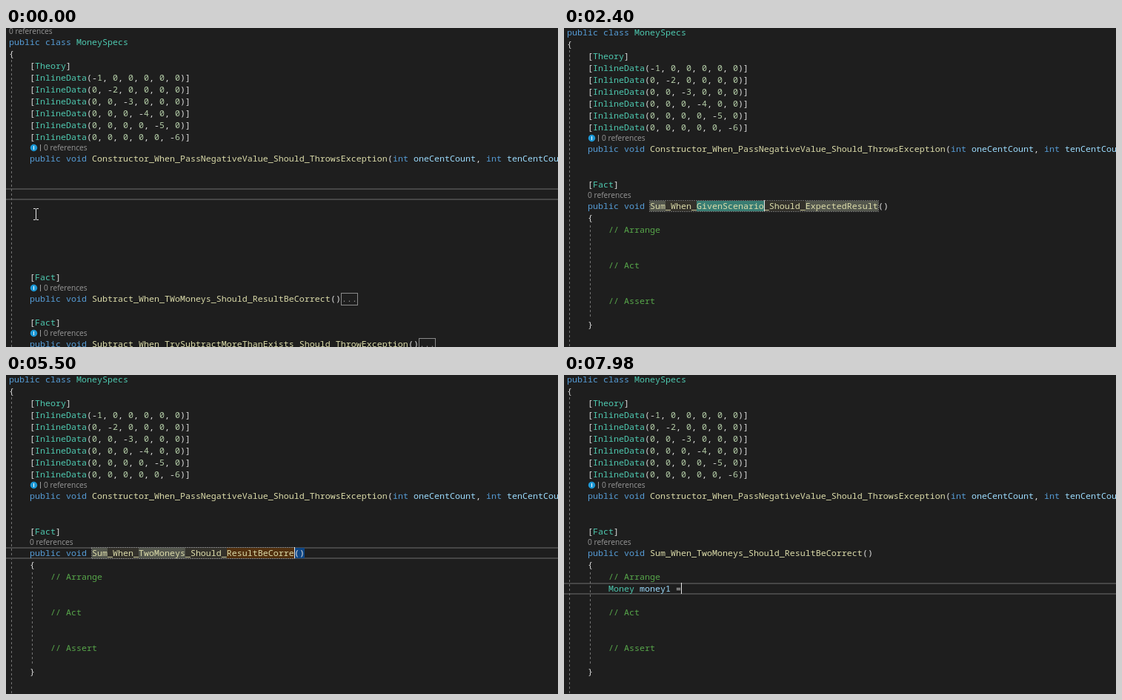
Write an HTML page with a canvas that moves like this. It is 745 px wide and 430 px high and loops after 8000 ms.

```html
<!DOCTYPE html>
<html lang="en">
<head>
<meta charset="utf-8">
<title>Code editor</title>
<style>
html, body { margin: 0; height: 100%; overflow: hidden; background: #1e1e1e; }
canvas { display: block; }
</style>
</head>
<body>
<canvas id="stage" width="745" height="430"></canvas>
<script>
const ctx = document.getElementById('stage').getContext('2d');
const LOOP = 8000, CHAR = 7, NAME_X = 116, NAME_ROW = 232;
const EXPAND = 1400, LENS = 1700;
const FONT = '11.667px "Noto Sans Mono", "DejaVu Sans Mono", monospace';
const LENS_FONT = '10.2px "Open Sans", "Noto Sans", sans-serif';
const TOKEN = /\/\/.*|\w+|[^\w\s]/g;

const COLORS = [
  [/^\/\//, '#57a64a'],
  [/^(public|class|void|int)$/, '#569cd6'],
  [/^(MoneySpecs|Theory|InlineData|Fact|Money)$/, '#4ec9b0'],
  [/^\d/, '#b5cea8'],
  [/_/, '#dcdcaa'],
  [/^(oneCentCount|tenCentCount|money1)$/, '#9cdcfe']
];

// Time of each key press, per word
const FIELDS = [
  { blank: 'MethodName', word: 'Sum', keys: [1900, 2220, 2300], from: 0 },
  { blank: 'GivenScenario', word: 'TwoMoneys', from: 2400,
    keys: [2720, 2800, 2880, 2960, 3040, 3120, 3200, 3280, 3440] },
  { blank: 'ExpectedResult', word: 'ResultBeCorrect', from: 3560,
    keys: [3880, 4160, 4380, 4520, 4580, 4620, 4780, 4880, 5000, 5140, 5240, 5400, 5500, 5720, 5780] }
];
const JOINS = ['_When_', '_Should_', ''];

function rect(x, y, w, h, color) {
  ctx.fillStyle = color;
  ctx.fillRect(x, y, w, h);
}

// Draws one line of code; y is the top of its 16 px row
function code(text, x, y) {
  ctx.font = FONT;
  for (const m of text.matchAll(TOKEN)) {
    const rule = COLORS.find(([re]) => re.test(m[0]));
    ctx.fillStyle = rule ? rule[1] : '#dcdcdc';
    ctx.fillText(m[0], x + m.index * CHAR, y + 12);
  }
}

function lens(x, base, icon) {
  if (icon) {
    ctx.fillStyle = '#1c97d4';
    ctx.beginPath();
    ctx.arc(x + 5.5, base - 3.5, 4.7, 0, 7);
    ctx.fill();
    rect(x + 5, base - 6, 1, 5, '#fff');
    rect(x + 14, base - 8, 1, 9, '#999');
    x += 19;
  }
  ctx.font = LENS_FONT;
  ctx.fillStyle = '#999';
  ctx.fillText('0 references', x, base);
}

function guide(x, from, to) {
  ctx.strokeStyle = '#747474';
  ctx.lineWidth = 1;
  ctx.setLineDash([3, 3]);
  ctx.beginPath();
  ctx.moveTo(x + .5, from);
  ctx.lineTo(x + .5, to);
  ctx.stroke();
  ctx.setLineDash([]);
}

function currentRow(y) {
  rect(0, y, 745, 2, '#464646');
  rect(0, y + 14, 745, 2, '#464646');
}

const caret = (x, y) => rect(x, y, 1, 15, '#e6e6e6');
const brace = (x, y) => rect(x, y + 1, CHAR, 14, '#0e4583');

function folded(text, y) {
  code(text, 32, y);
  const x = 32 + text.length * CHAR;
  ctx.strokeStyle = '#8a8a8a';
  ctx.lineWidth = 1;
  ctx.strokeRect(x + .5, y + .5, 22, 16);
  ctx.fillStyle = '#999';
  ctx.fillText('...', x + 1, y + 12);
}

function ibeam(x, y) {
  rect(x, y - 7, 1, 14, '#e8e8e8');
  for (const end of [-8, 7]) {
    rect(x - 3, y + end, 3, 1, '#e8e8e8');
    rect(x + 1, y + end, 3, 1, '#e8e8e8');
  }
}

function mouse(t) {
  if (t >= 800) return;
  const ease = (a, b) => {
    const p = Math.min(1, Math.max(0, (t - a) / (b - a)));
    return p * p * (3 - 2 * p);
  };
  const away = ease(300, 640);
  ibeam(Math.round(40 + 70 * away), Math.round(251 - 42 * ease(20, 240) + 159 * away));
}

function head(top) {
  guide(7, top + 32, 430);
  code('public class MoneySpecs', 4, top);
  code('{', 4, top + 16);
  code('[Theory]', 32, top + 32);
  for (let i = 0; i < 6; i++) {
    const args = Array.from({ length: 6 }, (_, k) => k === i ? -1 - i : 0);
    code(`[InlineData(${args.join(', ')})]`, 32, top + 48 + i * 16);
  }
  lens(4, top - 3);
  lens(32, top + 154, true);
  code('public void Constructor_When_PassNegativeValue_Should_ThrowsException(int oneCentCount, int tenCentCount,', 32, top + 157);
}

function before(t) {
  const row = t < 260 ? 216 : 200;
  currentRow(row);
  head(11);
  const typed = t >= 860;
  if (typed) code('x', 32, row);
  if (t >= 260) caret(typed ? 39 : 32, row);
  code('[Fact]', 32, 328);
  lens(32, 354, true);
  folded('public void Subtract_When_TWoMoneys_Should_ResultBeCorrect()', 357);
  code('[Fact]', 32, 389);
  lens(32, 415, true);
  folded('public void Subtract_When_TrySubtractMoreThanExists_Should_ThrowException()', 418);
  mouse(t);
}

function methodName(t) {
  const active = t < 2400 ? 0 : t < 3560 ? 1 : 2;
  const fresh = t < FIELDS[0].keys[0];
  const editing = t < 5940;
  let name = '', caretX = 0, selected = false;
  const boxes = FIELDS.map((f, i) => {
    const count = f.keys.filter(k => k <= t).length;
    const text = count ? f.word.slice(0, count) : f.blank;
    const x = NAME_X + name.length * CHAR, w = text.length * CHAR;
    name += text + JOINS[i];
    if (i === active) {
      selected = !count;
      caretX = x + w;
    }
    return [x, w, i !== active ? '#53564d' : count ? '#51300f' : '#397d73'];
  });
  const width = name.length * CHAR;

  if (!selected && t < 6100) currentRow(NAME_ROW);
  if (fresh) {
    rect(NAME_X, NAME_ROW, width, 16, '#6b9a3c');
    rect(NAME_X + 1, NAME_ROW + 1, width - 2, 14, '#416f1d');
    rect(NAME_X, NAME_ROW + 1, boxes[0][1], 14, boxes[0][2]);
  } else if (t < 7320) {
    rect(NAME_X, NAME_ROW + 1, width, 14, '#33312b');
    if (editing) for (const [x, w, color] of boxes) rect(x, NAME_ROW + 1, w, 14, color);
    ctx.strokeStyle = '#b4b4b4';
    ctx.lineWidth = 1;
    ctx.setLineDash([1, 2]);
    ctx.strokeRect(NAME_X - .5, NAME_ROW + .5, width + 1, 15);
    ctx.setLineDash([]);
  }
  if (editing && active === 2) {
    brace(NAME_X + width, NAME_ROW);
    brace(NAME_X + width + CHAR, NAME_ROW);
  }
  code(`public void ${name}()`, 32, NAME_ROW);
  if (t < 6100) caret(caretX, NAME_ROW);
}

function bodyCaret(t) {
  if (t < 6100) return;
  const up = t < 6400 ? 0 : Math.min(7, Math.floor((t - 6400) / 40));
  const row = 392 - up * 16;
  currentRow(row);
  if (!up) {
    brace(32, 248);
    brace(32, 392);
    return;
  }
  if (up < 7) return caret(39, row);
  const typed = 'Money money1 ='.slice(0, t < 7320 ? 0 : Math.floor((t - 7320) / 50) + 1);
  code(typed, 60, row);
  const hidden = t >= 6840 && t < 7000 || t >= 7160 && t < 7320;
  if (!hidden) caret(60 + typed.length * CHAR, row);
}

function after(t) {
  bodyCaret(t);
  head(-2);
  code('[Fact]', 32, 203);
  if (t >= LENS) {
    lens(32, 229);
    guide(35, 266, 389);
  }
  methodName(t);
  code('{', 32, 248);
  ['Arrange', 'Act', 'Assert'].forEach((s, i) => code('// ' + s, 60, 264 + i * 48));
  code('}', 32, 392);
}

function draw(now) {
  const t = now % LOOP;
  rect(0, 0, 745, 430, '#1e1e1e');
  (t < EXPAND ? before : after)(t);
}

let start;
function tick(now) {
  start ??= now;
  draw(now - start);
  requestAnimationFrame(tick);
}
requestAnimationFrame(tick);
</script>
</body>
</html>
```
